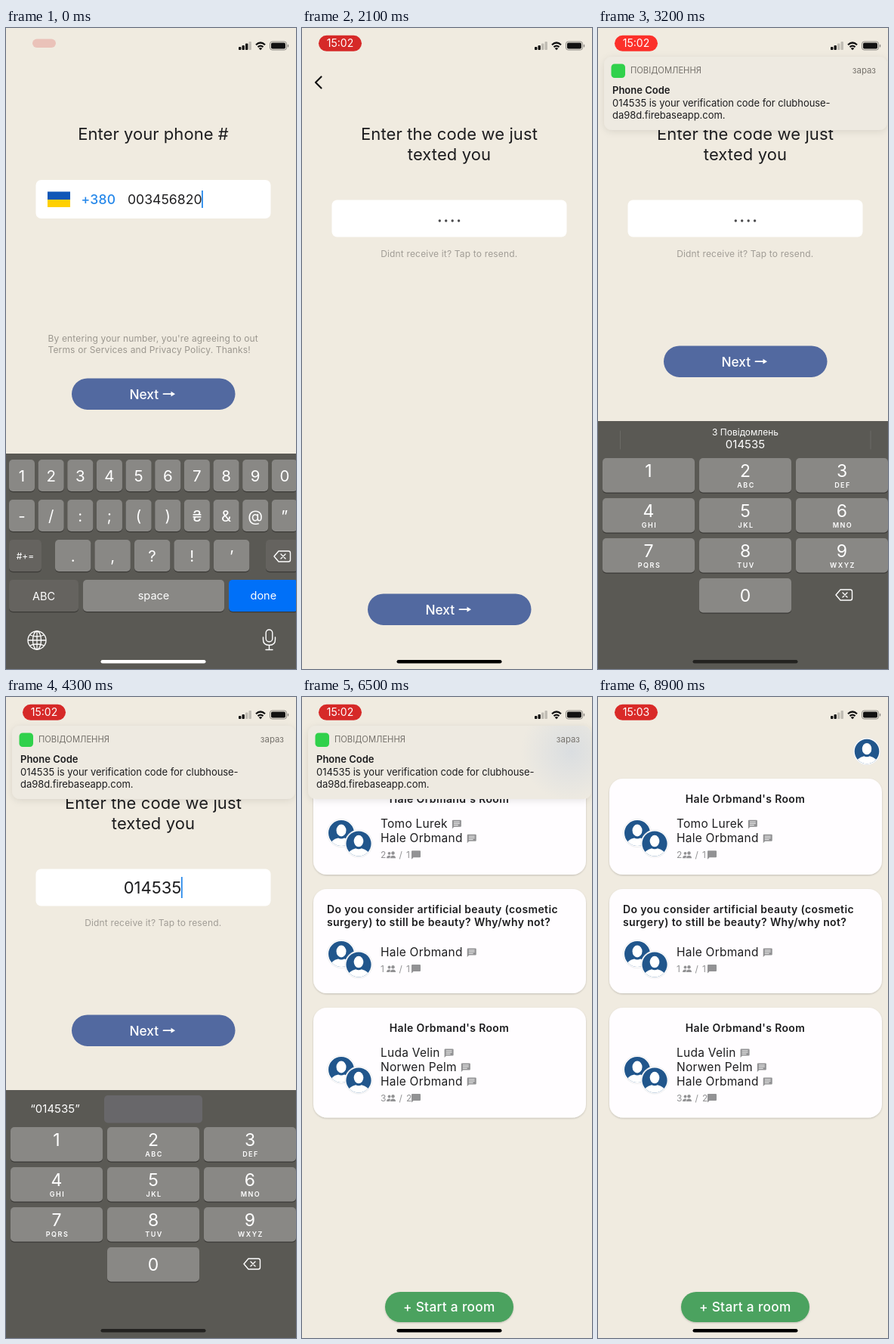
Animation, 384 px wide and 848 px high, one loop 9 s. Source, as an HTML page:

```html
<!DOCTYPE html>
<html lang="en">
<head>
<meta charset="utf-8">
<title>Phone sign-in</title>
<style>
  html, body { margin: 0; width: 100%; height: 100%; overflow: hidden; background: #f0ebe0; }
  svg { position: fixed; inset: 0; width: 100%; height: 100%; font-family: Inter, "Noto Sans", sans-serif; }
  text { white-space: pre; }
</style>
</head>
<body>
<svg id="stage" viewBox="0 0 384 848"></svg>
<script>
const LOOP = 9000, W = 384, H = 848;
const ALPHA_H = 285, PAD_H = 328;
const CREAM = '#f0ebe0', INK = '#1d1d1f', BLUE = '#21568c';

// ---- markup helpers ----
const text = (x, y, size, str, { fill = INK, weight = 400, anchor = 'start', ls = 0, id = '', cls = '' } = {}) =>
  `<text x="${x}" y="${y}" font-size="${size}" fill="${fill}" font-weight="${weight}" text-anchor="${anchor}" letter-spacing="${ls}"${id && ` id="${id}"`}${cls && ` class="${cls}"`}>${str}</text>`;
const mid = (x, y, size, str, opts = {}) => text(x, y, size, str, { anchor: 'middle', ...opts });
const rect = (x, y, w, h, r, fill, more = '') =>
  `<rect x="${x}" y="${y}" width="${w}" height="${h}" rx="${r}" fill="${fill}" ${more}/>`;
const line = (d, stroke, width, more = '') =>
  `<path d="${d}" fill="none" stroke="${stroke}" stroke-width="${width}" stroke-linecap="round" stroke-linejoin="round" ${more}/>`;
const group = (id, body, more = '') => `<g id="${id}" ${more}>${body}</g>`;
const page = () => rect(0, 0, W, H, 0, CREAM);

const nextButton = () =>
  rect(87, 748.4, 216.5, 41.5, 20.7, '#5269a0') +
  text(163.5, 775.5, 17.3, 'Next', { fill: '#fff', weight: 500 }) +
  line('M208.500 769.200H221', '#fff', 1.8) +
  '<path d="M218.500 765.800L224 769.200L218.500 772.600Z" fill="#fff"/>';

// ---- keyboards, drawn from their own top edge ----
const key = (x, y, w, h, fill = '#898885') =>
  rect(x, y + 1.2, w, h, 5, '#3b3a37') + rect(x, y, w, h, 5, fill);
const white = { fill: '#fff' };
const backspace = (x, y) =>
  line(`M${x - 11} ${y}l6-7h13q2.500 0 2.500 2.500v9q0 2.500-2.500 2.500h-13z`, '#fff', 1.4) +
  line(`M${x - 2} ${y - 3}l6 6m0-6l-6 6`, '#fff', 1.4);

function alphaKeyboard() {
  let out = rect(0, 0, W, ALPHA_H, 0, '#5a5954');
  ['1234567890', '-/:;()₴&@”'].forEach((row, r) => [...row].forEach((c, i) => {
    const x = 4 + 38.65 * i, y = 8 + 53 * r;
    out += key(x, y, 34, 42) + mid(x + 17, y + 29, 20.5, c === '&' ? '&amp;' : c, white);
  }));
  [...'.,?!’'].forEach((c, i) => {
    const x = 65 + 52.5 * i;
    out += key(x, 114, 47.3, 42) + mid(x + 23.6, 143, 20.5, c, white);
  });
  out += key(4, 114, 43, 42, '#65635f') + mid(25.5, 140, 12, '#+=', white);
  out += key(344, 114, 43, 42, '#65635f') + backspace(366, 136);
  out += key(4, 167, 92, 42, '#65635f') + mid(50, 194, 14.5, 'ABC', white);
  out += key(102, 167, 187, 42) + mid(195.5, 193, 14.5, 'space', white);
  out += key(295, 167, 92, 42, '#0070f8') + mid(340.8, 193, 14.5, 'done', white);
  out += '<g fill="none" stroke="#fff" stroke-width="1.3"><circle cx="41" cy="247" r="12"/><ellipse cx="41" cy="247" rx="5.500" ry="12"/>' +
    '<path d="M29 247h24M41 235v24M31.500 240q9.500 4 19 0M31.500 254q9.500-4 19 0"/></g>';
  out += rect(344.2, 233, 8.6, 16, 4.3, 'none', 'stroke="#fff" stroke-width="1.4"') +
    line('M340.500 243v3q0 7.500 8 7.500t8-7.500v-3M348.500 254v5M344 259.500h9', '#fff', 1.4);
  return out;
}

function numberPad() {
  let out = rect(0, 0, W, PAD_H, 0, '#5a5954');
  const letters = ['', 'ABC', 'DEF', 'GHI', 'JKL', 'MNO', 'PQRS', 'TUV', 'WXYZ'];
  const padKey = (digit, sub, col, row) => {
    const x = 6 + 128 * col, y = 49 + 53 * row;
    out += key(x, y, 122, 45.5) + mid(x + 61, y + (digit ? 25 : 31), 23, digit, white) +
      mid(x + 62, y + 38.5, 9, sub, { fill: '#fff', weight: 600, ls: 1.5 });
  };
  letters.forEach((sub, i) => padKey(i + 1, sub, i % 3, i / 3 | 0));
  padKey(0, '', 1, 3);
  out += backspace(326, 230);
  out += group('offer', mid(195, 19, 12, 'З Повідомлень', white) + mid(195, 35.5, 15, '014535', white) +
    line('M29.500 13v24M361 13v24', '#6b6a66', 1));
  out += group('filled', rect(130, 7, 130, 36.5, 5, '#68676a') + mid(65, 30, 15, '“014535”', white));
  return out;
}

// ---- rooms ----
const avatar = (x, y, r) =>
  `<g transform="translate(${x} ${y}) scale(${r / 17})"><circle r="18.600" fill="#fff" stroke="#e6e6e8" stroke-width=".7"/>` +
  `<circle r="17" fill="${BLUE}"/><g clip-path="url(#round)" fill="#fff"><ellipse cy="-3.500" rx="6.500" ry="7.900"/>` +
  '<path d="M-15.500 18Q-14 8.500-4 6.500Q0 8.500 4 6.500Q14 8.500 15.500 18Z"/></g></g>';
const bubble = (x, y, lines) =>
  `<path transform="translate(${x} ${y})" d="M1 0H11Q12 0 12 1V8Q12 9 11 9H2.500L0 11.500V1Q0 0 1 0Z" fill="#929294"/>` +
  (lines ? line(`M${x + 2.5} ${y + 2.4}h7m-7 2.200h7m-7 2.200h5`, '#fff', 0.9) : '');
const people = (x, y) =>
  `<g transform="translate(${x} ${y})" fill="#929294"><circle cx="3.500" cy="2.500" r="1.900"/><circle cx="8.500" cy="2.200" r="2.200"/>` +
  '<path d="M0 9Q0 5.500 3.500 5.500Q5 5.500 5.300 6Q4.300 7 4.300 9ZM5 9Q5 5.500 8.500 5.500T12 9Z"/></g>';

function card(y, h, title, names, firstName, people1, talks) {
  const grey = { fill: '#929294' }, heading = { weight: 600, ls: 0.37 };
  const countY = firstName + 19 * (names.length - 1) + 20.5;
  const faceY = y + (names.length === 1 ? 86 : names.length === 2 ? 72 : 82);
  let out = rect(15, y, 361, h, 18, '#fffdff', 'filter="url(#soft)"');
  out += title.length > 1
    ? title.map((t, i) => text(33, y + 32 + 17 * i, 14, t, heading)).join('')
    : mid(195, y + 32, 14, title[0], heading);
  out += avatar(52, faceY, 17) + avatar(75, faceY + 14, 16.6);
  names.forEach((n, i) => out += text(104, firstName + 19 * i, 15.5, n, { ls: 0.25, cls: 'speaker' }));
  out += text(104, countY, 12, people1, grey) + people(112, countY - 8.5) + text(128.5, countY, 12, '/', grey) +
    text(138, countY, 12, talks, grey) + bubble(145, countY - 9.5, false);
  return out;
}

const HOST = 'Hale Orbmand';
const rooms = () => page() + avatar(356, 72, 16.3) +
  card(108, 127, [HOST + "'s Room"], ['Tomo Lurek', HOST], 173.3, 2, 1) +
  card(254, 138, ['Do you consider artificial beauty (cosmetic', 'surgery) to still be beauty? Why/why not?'], [HOST], 343, 1, 1) +
  card(411, 145.5, [HOST + "'s Room"], ['Luda Velin', 'Norwen Pelm', HOST], 476, 3, 2) +
  rect(110, 787, 170, 40, 20, '#4ca25e', 'filter="url(#soft)"') +
  mid(194.8, 813.2, 17.3, '+ Start a room', { fill: '#fff', weight: 500, ls: 0.3 });

// ---- sign-in pages ----
const phonePage = () => page() +
  mid(195, 148, 22, 'Enter your phone #', { ls: 0.05 }) +
  rect(39.5, 201, 311, 51, 7, '#fff') +
  rect(55, 216.5, 30, 10.5, 0, '#1057b7') + rect(55, 227, 30, 10, 0, '#ffd000') +
  text(99.5, 233.2, 17.5, '+380', { fill: '#2688ea', weight: 500, ls: 0.25 }) +
  text(161, 233.2, 17.6, '003456820', { id: 'number' }) +
  rect(260, 215, 1.8, 23, 0, '#2688ea', 'id="phoneCaret"') +
  group('phoneFoot', ['By entering your number, you\'re agreeing to out', 'Terms or Services and Privacy Policy. Thanks!']
    .map((t, i) => text(55.5, 700 + 15 * i, 12, t, { fill: '#9b978f', ls: 0.15 })).join('') + nextButton());

const codePage = () => page() +
  line('M25.500 64.500L18 72L25.500 79.500', '#111', 2.2) +
  mid(195, 148, 22, 'Enter the code we just', { ls: 0.1 }) + mid(195, 174.5, 22, 'texted you', { ls: 0.1 }) +
  rect(39.5, 227.5, 311, 49, 7, '#fff') +
  group('dots', [182.3, 190.7, 199.2, 207.6].map(x => `<circle cx="${x}" cy="255" r="1.700" fill="#4a4a4c"/>`).join('')) +
  mid(194, 260, 22, '014535', { id: 'code' }) +
  rect(0, 238, 1.8, 28, 0, '#2688ea', 'id="codeCaret"') +
  mid(194.8, 303, 12, 'Didnt receive it? Tap to resend.', { fill: '#a19d96', ls: 0.17 }) +
  group('codeFoot', nextButton());

const edge = rect(-19, 0, 19, H, 0, 'url(#edge)');

const statusBar = () =>
  [4, 6, 8.5, 11].map((h, i) => rect(308 + 4.5 * i, 29 - h, 3.4, h, 0.9, '#111', `id="bar${i}"`)).join('') +
  line('M331 22.300Q337 16.700 343 22.300M333.500 25.100Q337 22 340.500 25.100', '#111', 2.2, 'style="stroke-linecap:butt"') +
  '<path d="M337 29.300L334.700 27Q337 25 339.300 27Z" fill="#111"/>' +
  rect(349.5, 18, 22, 11, 3, 'none', 'stroke="#8c8983" stroke-width="1"') + rect(351, 19.5, 19, 8, 1.8, '#111') +
  rect(372.8, 21.8, 1.4, 3.6, 0.7, '#8c8983') +
  group('pill', rect(-28.5, -10.5, 57, 21, 10.5, '#f33', 'id="pillBody"') +
    mid(0, 5, 14, '15:02', { fill: '#fff', id: 'clock' }));

const banner = () =>
  rect(8, 0, 375, 97, 11, '#eeeae1', 'filter="url(#drop)"') +
  rect(8, 0, 375, 97, 11, 'url(#tint)', 'id="bannerTint"') +
  rect(17.5, 9.5, 18.5, 18.5, 4.5, '#30d14b') +
  text(43, 22, 11.2, 'ПОВІДОМЛЕННЯ', { fill: '#77736d' }) +
  text(368, 22.3, 11.4, 'зараз', { fill: '#77736d', anchor: 'end' }) +
  text(19, 49, 13, 'Phone Code', { weight: 600 }) +
  text(19, 66, 13, '014535 is your verification code for clubhouse-', { ls: -0.05 }) +
  text(19, 82, 13, 'da98d.firebaseapp.com.', { ls: -0.05 });

const stage = document.getElementById('stage');
stage.innerHTML = `<defs>
  <clipPath id="round"><circle r="17"/></clipPath>
  <linearGradient id="edge"><stop stop-opacity="0"/><stop offset="1" stop-opacity=".24"/></linearGradient>
  <radialGradient id="tint" gradientUnits="userSpaceOnUse" cx="356" cy="34" r="66">
    <stop stop-color="#c6d1e0" stop-opacity=".5"/><stop offset="1" stop-color="#c6d1e0" stop-opacity="0"/></radialGradient>
  <filter id="soft" x="-5%" y="-10%" width="110%" height="125%"><feDropShadow dx="0" dy="1" stdDeviation="1" flood-opacity=".2"/></filter>
  <filter id="drop" x="-5%" y="-15%" width="110%" height="135%"><feDropShadow dx="0" dy="2" stdDeviation="5" flood-opacity=".1"/></filter>
  </defs>` +
  group('phone', phonePage()) + group('alpha', alphaKeyboard()) +
  group('codeScreen', edge + codePage()) + group('pad', numberPad()) +
  group('roomScreen', edge + rooms()) +
  group('status', statusBar()) + group('banner', banner()) +
  rect(125.5, 836, 139, 4.6, 2.3, '#000', 'id="home"');

const el = id => document.getElementById(id);
const set = (id, attrs) => { for (const k in attrs) el(id).setAttribute(k, attrs[k]); };
const move = (id, x, y) => set(id, { transform: `translate(${x} ${y})` });
const show = (id, on) => set(id, { visibility: on ? 'visible' : 'hidden' });

// Things that sit right after a run of text.
const textEnd = node => node.getBBox().x + node.getComputedTextLength();
stage.querySelectorAll('.speaker').forEach(n =>
  n.insertAdjacentHTML('afterend', bubble(textEnd(n) + 6, n.getAttribute('y') - 10.5, true)));
set('phoneCaret', { x: textEnd(el('number')) - 0.5 });
const codeEnd = textEnd(el('code'));

// ---- motion ----
const span = (t, start, length) => Math.min(1, Math.max(0, (t - start) / length));
const easeOut = p => 1 - (1 - p) ** 3;
const easeIn = p => p * p;
const push = p => 1 - (1 - p) ** 2.25;
const blink = (t, since) => (t - since) % 1000 < 500;

const HIDE_ALPHA = 150, PUSH_CODE = 550, SHOW_BANNER = 2600, SHOW_PAD = 2700,
  FILL = 3900, PUSH_ROOMS = 5950, HIDE_BANNER = 7500, NEXT_MINUTE = 8000;

function draw(t) {
  const alphaTop = Math.round(H - ALPHA_H * (1 - easeOut(span(t, HIDE_ALPHA, 350))));
  move('alpha', 0, alphaTop);
  move('phoneFoot', 0, t < HIDE_ALPHA ? -ALPHA_H : 0);
  show('phoneCaret', t < HIDE_ALPHA && blink(t, 0));

  const toCode = push(span(t, PUSH_CODE, 500));
  const toRooms = push(span(t, PUSH_ROOMS, 500));
  move('phone', -W / 3 * toCode, 0);
  move('codeScreen', W * (1 - toCode) - W / 3 * toRooms, 0);
  move('roomScreen', W * (1 - toRooms), 0);
  show('codeScreen', toCode > 0);
  show('roomScreen', toRooms > 0);

  const focused = t >= SHOW_PAD && t < PUSH_ROOMS, filled = t >= FILL;
  const padUp = easeOut(span(t, SHOW_PAD, 474)) * (1 - easeOut(span(t, PUSH_ROOMS, 350)));
  move('pad', 0, Math.round(H - PAD_H * padUp));
  show('pad', padUp > 0);
  show('offer', padUp > 0 && !filled);
  show('filled', padUp > 0 && filled);
  move('codeFoot', 0, focused ? -PAD_H : 0);
  set('dots', { opacity: filled ? 0 : 1 });
  set('code', { opacity: filled ? 1 : 0 });
  set('codeCaret', {
    x: filled ? codeEnd - 0.5 : 193,
    opacity: focused && blink(t, filled ? FILL : SHOW_PAD) ? 1 : 0
  });

  const bannerIn = easeOut(span(t, SHOW_BANNER, 370)), bannerOut = easeIn(span(t, HIDE_BANNER, 350));
  move('banner', 0, Math.round(-110 + 148 * bannerIn * (1 - bannerOut)));
  show('banner', bannerIn > 0 && bannerOut < 1);
  set('bannerTint', { opacity: toRooms });

  const grow = easeOut(span(t, 0, 400));
  const glow = 0.5 + 0.5 * Math.cos((t - 1000) / 2200 * 2 * Math.PI);
  set('pill', { transform: `translate(50.500 20.300) scale(${0.54 + 0.46 * grow})`, opacity: 0.2 + 0.8 * grow });
  set('pillBody', { fill: `rgb(${214 + 38 * glow},${41 + 7 * glow},${40 + 2 * glow})` });
  set('clock', { opacity: span(t, 100, 300) });
  el('clock').textContent = t < NEXT_MINUTE ? '15:02' : '15:03';
  set('bar2', { opacity: t < PUSH_CODE ? 1 : 0.22 });
  set('bar3', { opacity: 0.22 });
  set('home', { fill: alphaTop < 836 ? '#fff' : padUp > 0.95 ? '#232220' : '#000' });
}

const begin = performance.now();
function tick() {
  draw((performance.now() - begin) % LOOP);
  requestAnimationFrame(tick);
}
tick();
</script>
</body>
</html>
```
